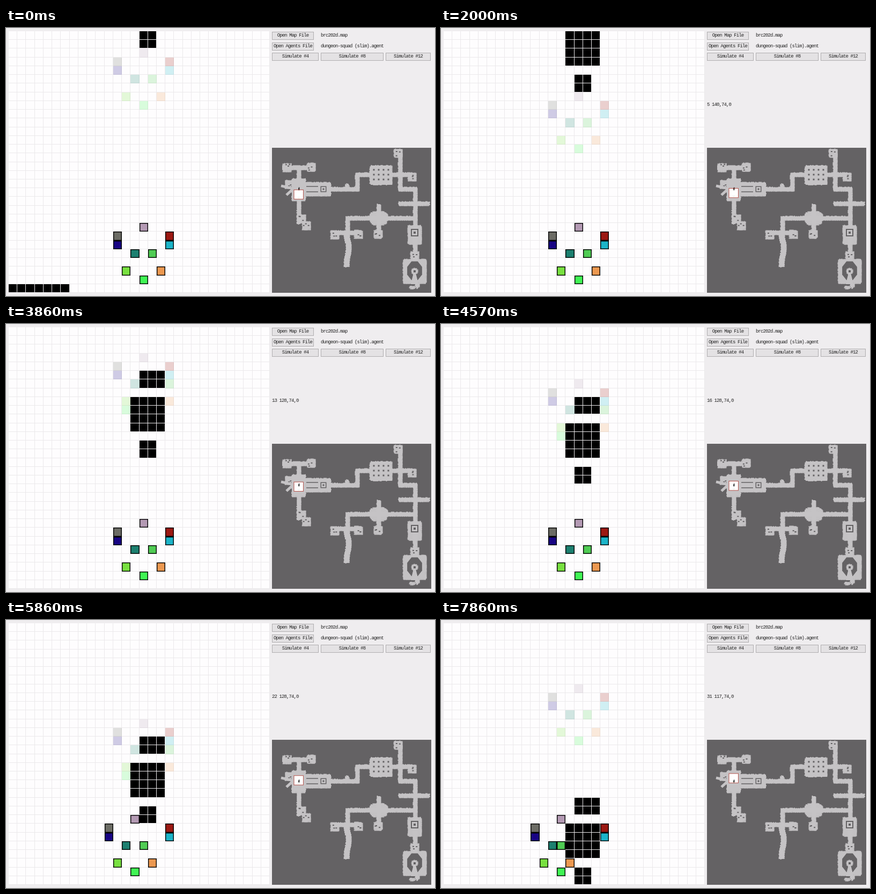
Animation, 800 px wide and 499 px high, one loop 8000 ms. Source, as an HTML page with a canvas:

```html
<!DOCTYPE html>
<html lang="en">
<head>
<meta charset="utf-8">
<title>Squad path simulation</title>
<style>
  html, body { margin: 0; width: 100%; height: 100%; overflow: hidden; background: #efedef; }
  canvas { position: absolute; left: 0; top: 0; }
  .btn, .txt {
    position: absolute;
    font: 9px/15px "Liberation Mono", monospace;
    letter-spacing: -.9px;
    color: #222;
    white-space: pre;
  }
  .btn {
    box-sizing: border-box;
    height: 15px;
    line-height: 13px;
    text-align: center;
    border: 1px solid #b0aeb0;
    background: #e4e2e4;
  }
</style>
</head>
<body>
<canvas id="stage" width="800" height="499"></canvas>
<div class="btn" style="left:496px;top:7px;width:78px">Open Map File</div>
<div class="btn" style="left:496px;top:27px;width:78px">Open Agents File</div>
<div class="btn" style="left:496px;top:46px;width:87px">Simulate #4</div>
<div class="btn" style="left:587px;top:46px;width:117px">Simulate #8</div>
<div class="btn" style="left:708px;top:46px;width:84px">Simulate #12</div>
<div class="txt" style="left:587px;top:7px">brc202d.map</div>
<div class="txt" style="left:587px;top:27px">dungeon-squad (slim).agent</div>
<div class="txt" id="status" style="left:496px;top:136px"></div>
<script>
const LOOP = 8000, FIRST = 770, PERIOD = 225, LAST_TICK = 31;
const COUNT = 30, SIZE = 487, CELL = SIZE / COUNT, LEFT = 5, TOP = 6;
const STALLS = [21, 25, 28];      // ticks at which the squad does not advance
const SIDESTEPS = [21, 28];       // ticks at which its free members step left
const FLOOR = '#c5c3c5', WALL = '#646264';
const ctx = document.getElementById('stage').getContext('2d');
const status = document.getElementById('status');

const squad = [
  { col: 15, row: 22, color: '#b49ab4' },
  { col: 12, row: 23, color: '#6c6c65' },
  { col: 18, row: 23, color: '#9c1812' },
  { col: 12, row: 24, color: '#180484' },
  { col: 18, row: 24, color: '#1cb4c8' },
  { col: 14, row: 25, color: '#1c8070' },
  { col: 16, row: 25, color: '#50cc54' },
  { col: 13, row: 27, color: '#78e040' },
  { col: 17, row: 27, color: '#ec9850', scout: true },
  { col: 15, row: 28, color: '#40f454' }
];

// Rows are relative to the scroll of the view
const blocks = [
  { col: 15, row: 0, w: 2, h: 2 },
  { col: 14, row: -5, w: 4, h: 4 },
  { col: 15, row: -8, w: 3, h: 2 },
  { col: 0, row: 29, w: 7, h: 1 }
];

const countUpTo = (ticks, tick) => ticks.filter(t => t <= tick).length;
const scrollAt = tick => tick - countUpTo(STALLS, tick);
const isBlocked = (col, row, scroll) => blocks.some(b =>
  col >= b.col && col < b.col + b.w && row >= b.row + scroll && row < b.row + scroll + b.h);

// Members dodge left around blocks and never come back
function columnAt(agent, tick) {
  let col = agent.col;
  for (let t = 0; t <= tick; t++) {
    if (agent.col < 18) col = Math.min(col, agent.col - countUpTo(SIDESTEPS, t));
    while (isBlocked(col, agent.row, scrollAt(t))) col--;
  }
  return col;
}

// Goals inside a block move to the nearest free column
function goalCells(shift, scroll) {
  const taken = new Set(squad.map(a => [a.col, a.row + shift].join())
    .filter(key => !isBlocked(...key.split(',').map(Number), scroll)));
  return squad.map(({ col, row, color }) => {
    const y = row + shift;
    let x = col;
    for (let d = 1; isBlocked(x, y, scroll) || (x !== col && taken.has([x, y].join())); d++)
      x = col + (d % 2 ? -1 : 1) * Math.ceil(d / 2);
    return { col: x, row: y, color };
  });
}

function getState(tick) {
  const scroll = scrollAt(tick);
  const stage = tick < 12 ? 0 : tick < 24 ? 1 : 2;
  const goal = [140, 128, 117][stage];
  return {
    scroll,
    goal,
    goals: goalCells(scroll + goal - 160, scroll),
    members: squad.map(a => ({
      color: a.color,
      col: columnAt(a, tick),
      row: a.row - (a.scout && tick >= 25 && tick < 27 ? 1 : 0)
    }))
  };
}

function drawMap() {
  const canvas = document.createElement('canvas');
  canvas.width = 800;
  canvas.height = 499;
  const g = canvas.getContext('2d');
  let seed = 77;
  const rnd = () => (seed = seed * 16807 % 2147483647) / 2147483647;
  const jut = () => Math.floor(rnd() * 2.6);
  const box = (cx, cy, w, h, color) => {
    g.fillStyle = color;
    g.fillRect(cx - w / 2, cy - h / 2, w, h);
  };

  // Superellipse with ragged edges: a high power gives a box
  const cave = (cx, cy, w, h, power = 12) => {
    const slices = (length, width, put) => {
      for (let i = 1; i < length - 1; i += 2) {
        const u = Math.abs(2 * (i + 1) / length - 1);
        const half = width / 2 * (1 - u ** power) ** (1 / power);
        const a = jut() - half, b = half - jut();
        if (b > a) put(i - length / 2, a, b - a);
      }
    };
    g.fillStyle = FLOOR;
    slices(w, h, (i, a, d) => g.fillRect(cx + i, cy + a, 2, d));
    slices(h, w, (i, a, d) => g.fillRect(cx + a, cy + i, d, 2));
  };

  // Starts at x, y; then each number is the next x or y in turn
  const hall = (x, y, turns, vertical) => {
    for (const to of turns) {
      const length = Math.abs(to - (vertical ? y : x)) + 8;
      if (vertical) cave(x, (y + to) / 2, 9, length);
      else cave((x + to) / 2, y, length, 9);
      if (vertical) y = to; else x = to;
      vertical = !vertical;
    }
  };
  const rings = (cx, cy, sizes) =>
    sizes.forEach((s, i) => box(cx, cy, s, s, i % 2 ? FLOOR : WALL));

  box(644.5, 358, 297, 270, WALL);
  hall(518, 260, [573]);
  hall(546, 260, [362], true);
  hall(600, 300, [655, 273, 755]);
  hall(735, 235, [300, 763, 435], true);
  hall(763, 354, [637, 384]);
  hall(612, 381, [658]);
  hall(695, 331, [380], true);
  hall(735, 327, [787]);
  for (let y = 386; y < 446; y += 4) cave(637 + 2 * Math.sin(y / 9), y, 11, 8);

  // Small rooms with a few pits
  [[524, 260], [569, 259], [757, 277], [731, 233], [613, 385], [657, 384],
   [694, 384], [551, 355], [560, 368], [528, 291], [762, 424]].forEach(([x, y]) => {
    cave(x, y, 17, 17);
    for (let i = 0; i < 3; i++) box(x + rnd() * 10 - 5, y + rnd() * 12 - 6, 3, 2, WALL);
  });

  cave(546, 301, 28, 43);
  cave(582, 300, 50, 27);
  cave(636, 297, 9, 16, 2);
  cave(699, 274, 43, 38);
  cave(695, 354, 35, 27, 3);
  cave(762, 385, 27, 37);
  cave(762, 453, 45, 47);

  g.strokeStyle = FLOOR;
  g.lineWidth = 5;
  for (const slope of [-1, 1]) {
    g.beginPath();
    g.moveTo(536, 299);
    g.lineTo(518 + slope * 5, 302 + slope * 9 * (slope > 0 ? 1 : .9));
    g.stroke();
  }

  for (let x = 686; x < 718; x += 9)
    for (let y = 264; y < 290; y += 9) box(x, y, 3, 3, WALL);
  for (const y of [295, 305]) box(571, y, 22, 1.5, WALL);
  rings(592, 300, [11, 8, 3]);
  rings(762, 381, [14, 10, 4]);

  // Shrine: dark octagon with a statue on a path
  g.fillStyle = WALL;
  g.beginPath();
  for (let i = 0; i < 8; i++) {
    const a = (i + .5) * Math.PI / 4;
    g.lineTo(762 + 15 * Math.cos(a), 452 + 19 * Math.sin(a));
  }
  g.fill();
  cave(762, 453, 13, 13, 2);
  for (let i = 0; i < 10; i++) box(762, 458 + 2 * i, 5 + i, 2, FLOOR);
  rings(762, 453, [4]);
  cave(758, 483, 13, 7, 2);
  cave(767, 480, 9, 12, 2);
  return canvas;
}

const map = drawMap();

const snapX = col => Math.round(LEFT + col * CELL);
const snapY = row => Math.round(TOP + row * CELL);

function fillCell({ col, row }, color, gap = 0, border = 0) {
  const x = snapX(col), y = snapY(row);
  ctx.fillStyle = color;
  ctx.fillRect(x + border, y + border,
    snapX(col + 1) - x - gap - 2 * border, snapY(row + 1) - y - gap - 2 * border);
}

function drawBoard({ scroll, members, goals }) {
  ctx.fillStyle = '#fefdfe';
  ctx.fillRect(LEFT, TOP, SIZE, SIZE);
  ctx.fillStyle = '#ebe9eb';
  for (let i = 1; i <= COUNT; i++) {
    ctx.fillRect(snapX(i) - 1, TOP, 1, SIZE);
    ctx.fillRect(LEFT, snapY(i) - 1, SIZE, 1);
  }
  ctx.globalAlpha = .2;
  goals.forEach(cell => fillCell(cell, cell.color));
  ctx.globalAlpha = 1;
  for (let row = 0; row < COUNT; row++)
    for (let col = 0; col < COUNT; col++)
      if (isBlocked(col, row, scroll)) fillCell({ col, row }, '#000', 1);
  for (const cell of members) {
    fillCell(cell, '#000');
    fillCell(cell, cell.color, 0, 1.4);
  }
}

function drawMinimap({ scroll, members }) {
  const size = 17.4, unit = size / COUNT, x = 537, y = 301.3 - scroll * .55;
  const dot = (col, row, w, h) =>
    ctx.fillRect(x + col * unit, y + row * unit, w * unit, h * unit);
  ctx.drawImage(map, 0, 0);
  ctx.fillStyle = '#fff';
  ctx.fillRect(x, y, size, size);
  ctx.globalAlpha = .3;
  for (const { col, row, color } of members) {
    ctx.fillStyle = color;
    dot(col, row, 1, 1);
  }
  ctx.globalAlpha = 1;
  ctx.fillStyle = '#000';
  blocks.slice(0, 3).forEach(b => dot(b.col, b.row + scroll, b.w, b.h));
  ctx.strokeStyle = '#b0443c';
  ctx.lineWidth = .9;
  ctx.strokeRect(x, y, size, size);
}

const start = performance.now();

function draw() {
  const time = (performance.now() - start) % LOOP;
  const tick = Math.min(LAST_TICK, Math.max(0, Math.floor((time - FIRST) / PERIOD)));
  const state = getState(tick);
  ctx.clearRect(0, 0, 800, 499);
  drawBoard(state);
  drawMinimap(state);
  status.textContent = tick ? `${tick} ${state.goal},74,0` : '';
  requestAnimationFrame(draw);
}
draw();
</script>
</body>
</html>
```
